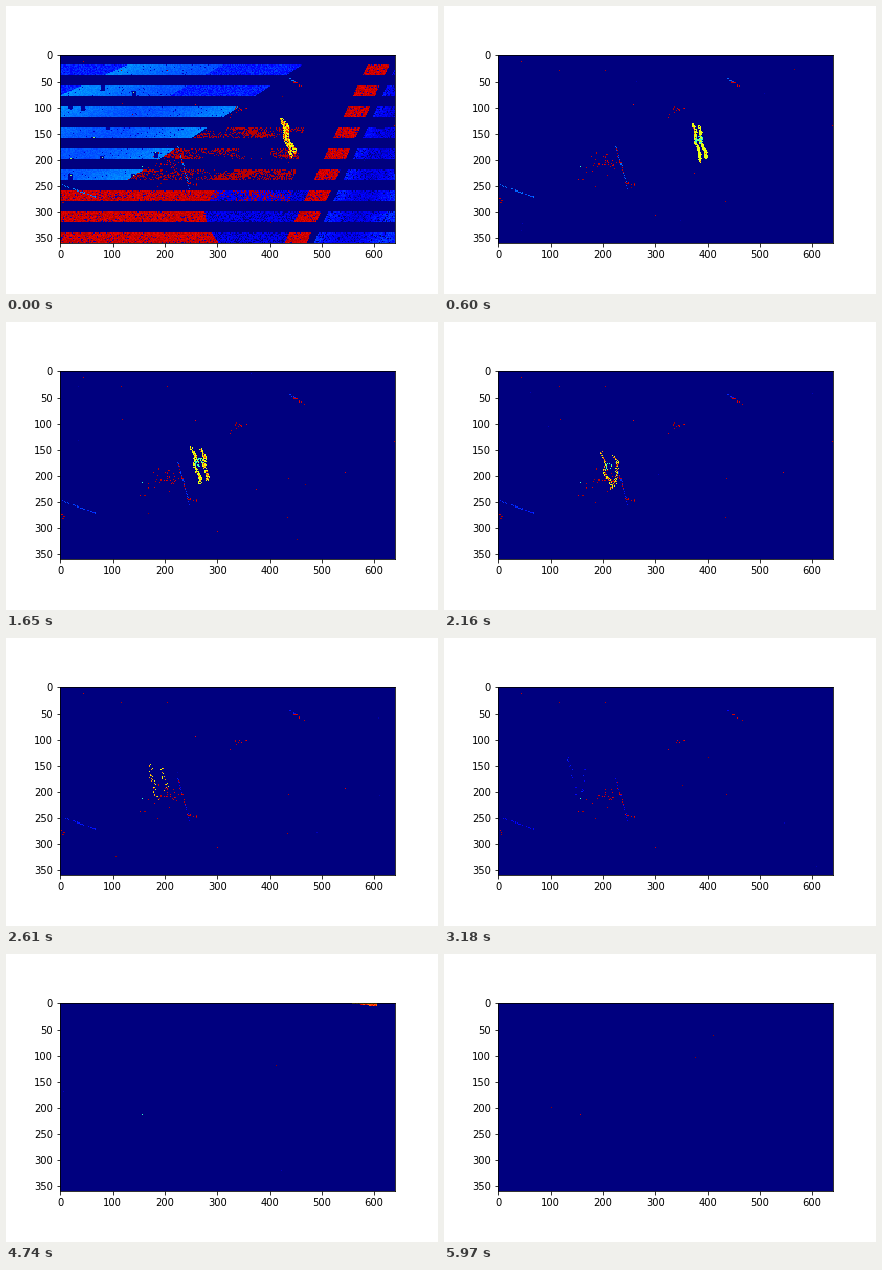
These frames come from a looping animation (432x288 px, 6 s). A matplotlib script:

```python
import numpy as np
import matplotlib.pyplot as plt
from matplotlib.animation import FuncAnimation

W, H, CELL = 640, 360, 2
FRAMES, STEP = 200, 30

X, Y = np.meshgrid(np.arange(0, W, CELL) + 1.0, np.arange(0, H, CELL) + 1.0)

# levels on the 0..255 colour scale
BLUE, CYAN, YELLOW, RED = 62, 104, 160, 238


def put(img, x, y, level):
    col = np.clip(np.asarray(x) / CELL, 0, W // CELL - 1).astype(int)
    row = np.clip(np.asarray(y) / CELL, 0, H // CELL - 1).astype(int)
    img[row, col] = level


def seg_dist(x0, y0, x1, y1, x=X, y=Y):
    dx, dy = x1 - x0, y1 - y0
    k = np.clip(((x - x0) * dx + (y - y0) * dy) / (dx * dx + dy * dy), 0, 1)
    return np.hypot(x - x0 - k * dx, y - y0 - k * dy)


def make_specks(seed=4):
    """Rows of x, y, level and lifetime in seconds."""
    rng = np.random.default_rng(seed)

    def strand(start, end, n, level, spread=0.5):
        k = rng.random((n, 1))
        xy = np.array(start) + k * np.subtract(end, start)
        return np.column_stack([xy + rng.normal(0, spread, (n, 2)),
                                level + rng.uniform(-8, 8, n),
                                rng.uniform(2.2, 4.3, n)])

    return np.vstack([
        strand((0, 248), (68, 272), 40, BLUE),
        strand((3, 270), (8, 284), 6, RED, 1),
        strand((226, 176), (247, 256), 34, BLUE),
        strand((227, 180), (245, 250), 16, RED),
        strand((240, 246), (262, 249), 10, RED, 1.5),
        strand((190, 192), (220, 220), 30, RED, 8),
        strand((155, 240), (200, 195), 14, RED, 6),
        strand((324, 111), (352, 102), 12, RED, 4),
        strand((432, 43), (450, 54), 8, BLUE),
        strand((446, 52), (466, 66), 9, RED, 1.5),
        strand((0, 0), (W, H), 14, RED, 90),
    ])


SPECKS = make_specks()


def draw_scene(img, rng):
    """Unsettled background, visible in every second 20-row band."""
    noise = rng.random(X.shape)
    grain = noise - 0.5
    view = np.zeros_like(img)

    # bright slope, upper left
    edge = 494 - 1.52 * Y
    sky = X < edge
    level = 60 + 8 * np.sin(X / 70 + Y / 45) + 10 * grain
    dull = (X < 130 - 2.2 * (Y - 20)) | ((X + 1.7 * Y > 345) & (Y < 100))
    level = np.where(dull, 38 + 24 * grain, level)
    view[sky] = level[sky]
    view[sky & (noise < 0.02)] = 15

    # windows
    for x, y in zip(rng.uniform(5, 200, 12), rng.uniform(60, 235, 12)):
        view[sky & (abs(X - x) < 4) & (abs(Y - y) < 6)] = 6
        put(view, x, y - 4, 130)

    # floor
    left = 597 - 0.467 * Y
    floor = (Y > 255) & (X < left)
    view[floor] = np.where(noise < 0.25, 0, 8 + 26 * noise)[floor]

    # red ground, flecks and strip
    patch = np.sin(X / 17 + 2 * np.sin(Y / 9)) + np.sin(X / 41 + Y / 13)
    flecks = ~sky & (Y > 125) & (Y < 280) & (X < 495 - 0.2 * Y)
    density = 0.25 * patch + np.where(Y > 215, 0.45, 0.25)
    view[flecks & (noise < density)] = 242
    ground = (Y > 252) & (X < 300 - 22 * np.sin((Y - 255) / 32))
    strip = (X > left) & (X < left + 42)
    red = ground | strip
    view[red] = (RED + 16 * grain)[red]
    view[red & (noise > 0.92)] = 12

    # textured wall on the right
    wall = X > left + 56
    level = 30 + 10 * np.sin(X / 23 + Y / 60) + 24 * grain
    view[wall] = np.where(noise < 0.12, 0, level)[wall]

    shown = (Y // 20) % 2 == 1
    img[shown] = view[shown]


def draw_walker(img, t, rng):
    if t > 3.7:
        return
    keys = [0, 0.6, 1.17, 2.16, 3.18, 3.8]
    cx = np.interp(t, keys, [437, 385, 316, 211, 147, 118])
    cy = np.interp(t, keys, [160, 170, 173, 191, 172, 168])
    gap = np.interp(t, keys[:4], [6, 11, 14, 24])
    swing = 3 * np.sin(2 * np.pi * t / 0.9)
    limbs = [(-12, -34, -3, 14), (gap - 13, -30, gap - 5, 6),
             (-3, 12, 6 + swing, 34), (gap - 5, 6, 12 - swing, 27)]

    noise, tint = rng.random(X.shape), rng.random(X.shape)
    x = X - cx + 2 * np.sin(Y / 6 + 9 * t)
    y = Y - cy
    body = np.min([seg_dist(*limb, x, y) for limb in limbs], axis=0)
    density = np.interp(t, [0, 1.5, 2.1, 2.6, 3.2, 3.7],
                        [0.95, 0.9, 0.5, 0.2, 0.07, 0])
    mask = (body < 2.2 + 2 * tint) & (noise < density)

    warm = np.interp(t, [0, 0.4, 1.3, 2.1], [0.4, 0.08, 0.06, 0.6])
    level = np.where(tint < warm, 185 + 55 * noise, YELLOW + 10 * grain_of(tint))
    if 0.2 < t < 2.4:
        core = np.hypot(x - 1, y + 6) < 8
        mask |= core & (noise < 0.5 * density)
        level = np.where(core & (tint < 0.75), CYAN + 12 * noise, level)
    if t > 2.7:
        level = 22 + 18 * tint
    img[mask] = level[mask]


def grain_of(tint):
    return tint - 0.5


def draw_passer(img, t, rng):
    """Something moving right along the top edge."""
    if t < 4.0:
        return
    cx = 582 + 60 * (t - 4.74)
    depth = np.interp(t, [4.0, 4.5, 5.0, 5.97], [3, 8, 8, 5])
    half = np.interp(t, [4.0, 4.6], [12, 25])
    bottom = depth * np.clip(0.75 + (X - cx) / half * 0.4, 0.5, 1)
    mask = (abs(X - cx) < half) & (Y < bottom)
    hot = np.interp(t, [4.0, 5.0, 5.9], [0.15, 0.25, 1])
    tint = rng.random(X.shape)
    level = np.where((tint < hot) | (Y > 4), 200 + 40 * tint, YELLOW + 16 * tint)
    img[mask] = level[mask]


def draw_specks(img, t, rng):
    x, y, level, life = SPECKS.T
    on = (t < life) & (rng.random(len(x)) > 0.1)
    fade = np.where(level < 80, 1 - 0.16 * t, 1)
    put(img, x[on], y[on], (level * fade)[on])
    put(img, 157, 215, RED if t > 5.4 else CYAN)

    n = int(np.interp(t, [0, 3, 4.5], [8, 5, 3]))
    put(img, rng.uniform(0, W, n), rng.uniform(0, H, n),
        rng.choice([10, 14, 252], n))


def frame_image(i):
    rng = np.random.default_rng(1000 + i)
    t = i * STEP / 1000
    img = np.zeros(X.shape)
    if i == 0:
        draw_scene(img, rng)
    draw_specks(img, t, rng)
    draw_walker(img, t, rng)
    draw_passer(img, t, rng)
    return img


fig, ax = plt.subplots(figsize=(6, 4), dpi=72)
fig.subplots_adjust(left=0.125, right=0.9, bottom=0.125, top=0.88)
picture = ax.imshow(frame_image(0), cmap="jet", vmin=0, vmax=255,
                    interpolation="nearest",
                    extent=(-0.5, W - 0.5, H - 0.5, -0.5))


def update(i):
    picture.set_data(frame_image(i))
    return [picture]


anim = FuncAnimation(fig, update, frames=FRAMES, interval=STEP,
                     repeat=True, repeat_delay=0)
plt.show()
```
